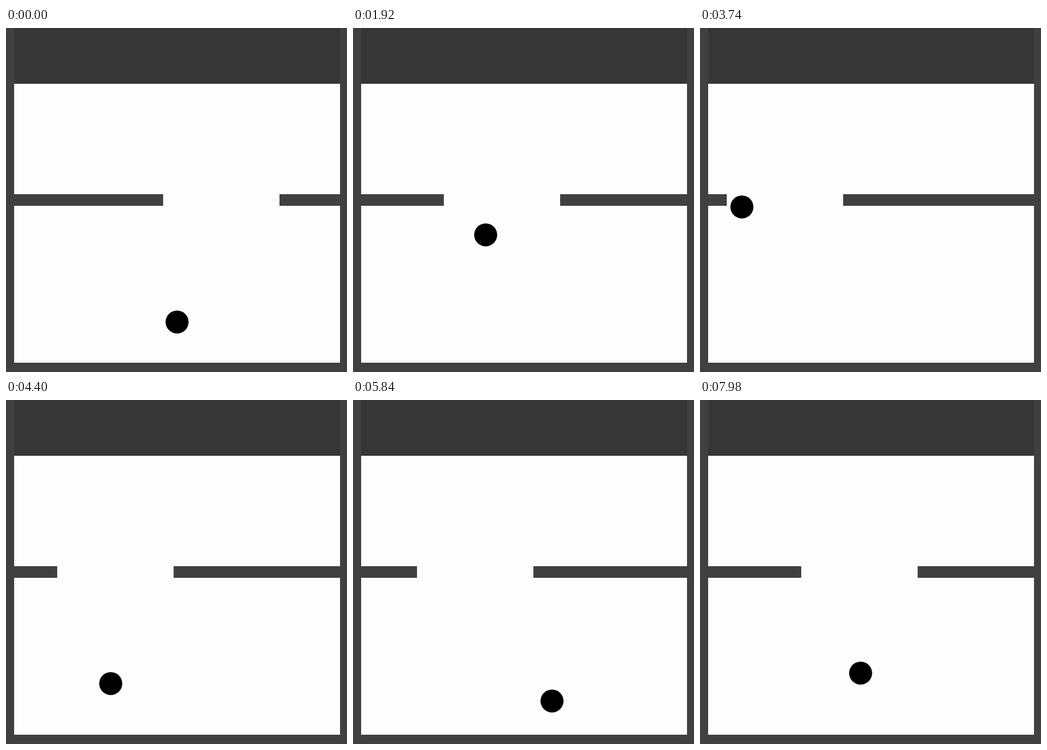
Write an HTML page with a canvas that moves like this. It is 586 by 592 pixels and loops after 8 s.

```html
<!DOCTYPE html>
<html lang="en">
<head>
<meta charset="utf-8">
<title>Ball and gate</title>
<style>
  html, body { margin: 0; width: 100%; height: 100%; overflow: hidden; background: #404040; }
  canvas { display: block; }
</style>
</head>
<body>
<canvas id="stage" width="586" height="592"></canvas>
<script>
const LOOP = 8000, TICK = 20;
const GAP_WIDTH = 200, GAP_SPEED = 0.1262; // px per ms
const BALL_STEP = 6, RADIUS = 19.8;
const HOME = { x: 294, y: 506 };
const ROOM = { left: 14, top: 96, right: 574, bottom: 576 };
const BAR = { top: 286, bottom: 306 };
const COLOR = { lid: '#363636', wall: '#404040', floor: '#fdfdfd', ball: '#000' };

// The gap glides at constant speed between these turning points, then rests.
const gapTurns = [270, 129, 193, 75, 135, 46, 109, 8, 168, 124, 174];

// Each run leaves home and turns at [time, x, y] until the ball is through the gap.
const runs = [
  { start: 0, turns: [[1000, 204, 266]] },
  { start: 1000, turns: [[1180, 306, 470], [1380, 312, 434], [2530, 132, 266]] },
  { start: 2530, turns: [[2620, 276, 512], [2860, 276, 512], [3740, 72, 308], [3840, 66, 290]] },
  { start: 3840, turns: [[4080, 246, 554], [4720, 108, 416], [5040, 174, 488],
                         [5700, 312, 548], [6080, 390, 470], [6660, 264, 344], [7000, 264, 266]] },
  { start: 7000, turns: [[7200, 276, 536], [7430, 276, 494], [7670, 276, 542], [7980, 276, 470]] }
];

const ctx = document.getElementById('stage').getContext('2d');
const mix = (a, b, part) => a + (b - a) * part;
const snap = (value, step, origin = 0) =>
  Math.round((value - origin) / step) * step + origin;

function gapAt(time) {
  let left = time * GAP_SPEED;
  for (let i = 1; i < gapTurns.length; i++) {
    const from = gapTurns[i - 1], way = gapTurns[i] - from;
    if (left <= Math.abs(way)) return snap(from + Math.sign(way) * left, 2);
    left -= Math.abs(way);
  }
  return gapTurns[gapTurns.length - 1];
}

function ballAt(time) {
  const run = runs.filter(r => r.start <= time).pop();
  let from = [run.start, HOME.x, HOME.y];
  for (const to of run.turns) {
    if (time < to[0]) {
      const part = (time - from[0]) / (to[0] - from[0]);
      return {
        x: snap(mix(from[1], to[1], part), BALL_STEP, HOME.x),
        y: snap(mix(from[2], to[2], part), BALL_STEP, HOME.y)
      };
    }
    from = to;
  }
  return { x: from[1], y: from[2] };
}

function box(color, left, top, right, bottom) {
  ctx.fillStyle = color;
  ctx.fillRect(left, top, Math.max(0, right - left), bottom - top);
}

function draw(time) {
  const gap = gapAt(time), ball = ballAt(time);

  box(COLOR.wall, 0, 0, 586, 592);
  box(COLOR.lid, ROOM.left, 0, ROOM.right, ROOM.top);
  box(COLOR.floor, ROOM.left, ROOM.top, ROOM.right, ROOM.bottom);
  box(COLOR.wall, ROOM.left, BAR.top, gap, BAR.bottom);
  box(COLOR.wall, gap + GAP_WIDTH, BAR.top, ROOM.right, BAR.bottom);

  ctx.fillStyle = COLOR.ball;
  ctx.beginPath();
  ctx.arc(ball.x, ball.y, RADIUS, 0, Math.PI * 2);
  ctx.fill();
}

const begin = performance.now();

function frame() {
  const time = Math.max(0, performance.now() - begin) % LOOP;
  draw(Math.floor(time / TICK) * TICK);
  requestAnimationFrame(frame);
}

frame();
</script>
</body>
</html>
```
